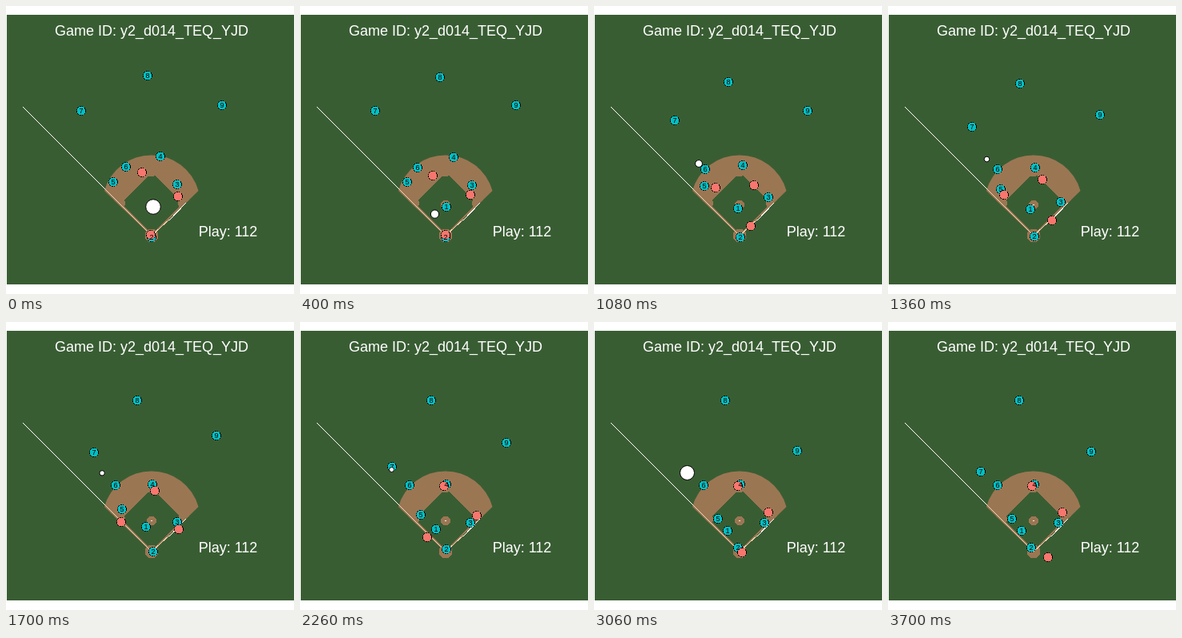
An HTML page for the animation above (3.72 s loop, 360x360 px).

```html
<!DOCTYPE html>
<html lang="en">
<head>
<meta charset="utf-8">
<title>Play 112</title>
<style>
  html, body { margin: 0; width: 100%; height: 100%; overflow: hidden; background: #fff; }
  svg { display: block; width: 100vw; height: 100vh; }
  text { font: 18px "Liberation Sans", Arial, sans-serif; text-anchor: middle; fill: #fff; }
  .label { font-size: 9px; fill: #000; }
  .player { stroke: #000; stroke-dasharray: 1.9 1; shape-rendering: crispEdges; }
</style>
</head>
<body>
<svg viewBox="0 0 360 360">
  <clipPath id="infield"><path d="M182 288L123 231A61 61 0 0 1 240.5 231Z"/></clipPath>
  <g shape-rendering="crispEdges">
    <path fill="#395d33" d="M1 11H360V348H1Z"/>
    <g fill="#9b7653">
      <g clip-path="url(#infield)">
        <path d="M100 180H260V300H100Z"/>
        <path fill="#395d33" d="M182 285L220.5 246.5L182 208L143.5 246.5Z"/>
        <circle cx="182" cy="206" r="7.5"/>
        <circle cx="141.5" cy="246.5" r="7.5"/>
        <circle cx="222.5" cy="246.5" r="7.5"/>
      </g>
      <circle cx="182" cy="287" r="8.5"/>
      <circle cx="182" cy="248.5" r="6"/>
    </g>
    <path fill="#fff" d="M181 248h2v1h-2z"/>
    <g fill="none" stroke="#fff">
      <path d="M21 126L182 287M204 268L225 246"/>
      <path stroke="#f0d3b5" d="M124 229L182 287L204 267"/>
    </g>
  </g>
  <text x="182" y="37">Game ID: y2_d014_TEQ_YJD</text>
  <text x="277.5" y="288">Play: 112</text>
  <g id="actors"></g>
</svg>
<script>
const LOOP = 3720, STEP = 20;

// Each player eases along one path between a start and an end time.
const route = (d, start, end) => ({ d, start, end });
const fielders = [
  route("M183 251L167 261", 300, 3060),
  route("M182 289Q187 286 179 282", 500, 3700),
  route("M214 223Q222 237 213 251", 150, 1900),
  route("M193 188L183 203", 200, 1550),
  route("M134 220L155 246", 300, 3000),
  route("M150 201L137 204", 0, 1400),
  route("M94 131Q111 159 116 187", 350, 2750),
  route("M177 87L164 98", 0, 1650),
  route("M270 124L254 162", 200, 3350)
];
const runners = [
  route("M181 286L216 259Q229 248 217.5 238", 250, 2700),
  route("M215 238L180 205", 50, 2300),
  route("M170 208L150 229Q138 243 146 255Q154 267 184 288L203 295", -150, 4100)
];
// Pitch, hit, roll, pick-up and throw; the radius grows with height.
const ballKeys = [
  { t: 0, cx: 184, cy: 251, r: 9.3 },
  { t: 220, cx: 182, cy: 286, r: 5 },
  { t: 800, cx: 138.5, cy: 202.5, r: 5.5 },
  { t: 1360, cx: 123.5, cy: 191.5, r: 3.3 },
  { t: 2260, cx: 114.5, cy: 184.5, r: 3 },
  { t: 3060, cx: 116.5, cy: 188.5, r: 9 },
  { t: 3500, cx: 180, cy: 203, r: 6 }
];

function create(tag, attrs, content = "") {
  const el = document.createElementNS("http://www.w3.org/2000/svg", tag);
  for (const name in attrs) el.setAttribute(name, attrs[name]);
  el.textContent = content;
  return el;
}
const actors = document.getElementById("actors");
const add = (...args) => actors.appendChild(create(...args));

function addPlayer({ d, start, end }, fill) {
  const path = create("path", { d });
  const parts = [add("circle", { class: "player", fill, r: 5.5 })];
  return { path, length: path.getTotalLength(), start, end, parts };
}
const players = [
  ...fielders.map(r => addPlayer(r, "#00bfc4")),
  ...runners.map(r => addPlayer(r, "#f8766d"))
];
fielders.forEach((_, i) =>
  players[i].parts.push(add("text", { class: "label", y: 3 }, i + 1)));
const ball = add("circle", { fill: "#fff", stroke: "#000" });

function ease(t, start, end) {
  const u = Math.min(1, Math.max(0, (t - start) / (end - start)));
  return u * u * (3 - 2 * u);
}

function drawPlayer({ path, length, start, end, parts }, t) {
  const { x, y } = path.getPointAtLength(length * ease(t, start, end));
  const move = `translate(${Math.round(x)} ${Math.round(y)})`;
  for (const part of parts) part.setAttribute("transform", move);
}

function drawBall(t) {
  const next = ballKeys.findIndex(key => key.t > t);
  ball.style.display = next < 0 ? "none" : "";
  if (next < 0) return;
  const a = ballKeys[next - 1], b = ballKeys[next];
  const u = (t - a.t) / (b.t - a.t);
  for (const name of ["cx", "cy", "r"]) {
    ball.setAttribute(name, a[name] + (b[name] - a[name]) * u);
  }
}

function draw() {
  const t = Math.floor(performance.now() % LOOP / STEP) * STEP;
  for (const player of players) drawPlayer(player, t);
  drawBall(t);
  requestAnimationFrame(draw);
}
draw();
</script>
</body>
</html>
```
